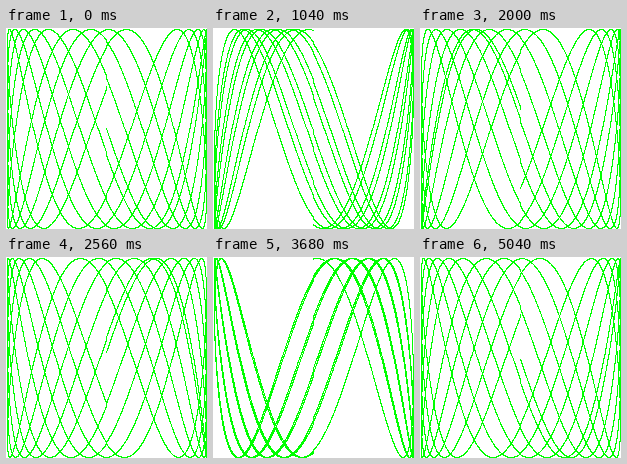
These frames come from a looping animation (201x201 px, 5120 ms). An HTML page with a canvas:

```html
<!DOCTYPE html>
<html lang="en">
<head>
<meta charset="utf-8">
<title>Lissajous</title>
<style>
  html, body { margin: 0; width: 100%; height: 100%; overflow: hidden; background: #fff; }
  canvas { display: block; width: 201px; height: 201px; image-rendering: pixelated; }
</style>
</head>
<body>
<canvas id="stage" width="201" height="201"></canvas>
<script>
  const SIZE = 100, SIDE = 2 * SIZE + 1;
  const CYCLES = 5, RES = 0.001, FREQ = 2.9142;
  const FRAMES = 64, DELAY = 80, PHASE_STEP = 0.1;
  const WHITE = 0xffffffff, GREEN = 0xff00ff00;

  const ctx = document.getElementById('stage').getContext('2d');
  const image = ctx.createImageData(SIDE, SIDE);
  const pixels = new Uint32Array(image.data.buffer);

  // Rounds by truncating toward zero, so the curve sits on whole pixels.
  const toPixel = v => SIZE + Math.trunc(v * SIZE + 0.5);

  function draw(phase) {
    pixels.fill(WHITE);
    for (let t = 0; t < CYCLES * 2 * Math.PI; t += RES) {
      const x = toPixel(Math.sin(t));
      const y = toPixel(Math.sin(t * FREQ + phase));
      pixels[y * SIDE + x] = GREEN;
    }
    ctx.putImageData(image, 0, 0);
  }

  const start = performance.now();
  let shown = -1;

  function tick() {
    const step = Math.floor((performance.now() - start) / DELAY) % FRAMES;
    if (step !== shown) {
      shown = step;
      draw(step * PHASE_STEP);
    }
    requestAnimationFrame(tick);
  }
  tick();
</script>
</body>
</html>
```
